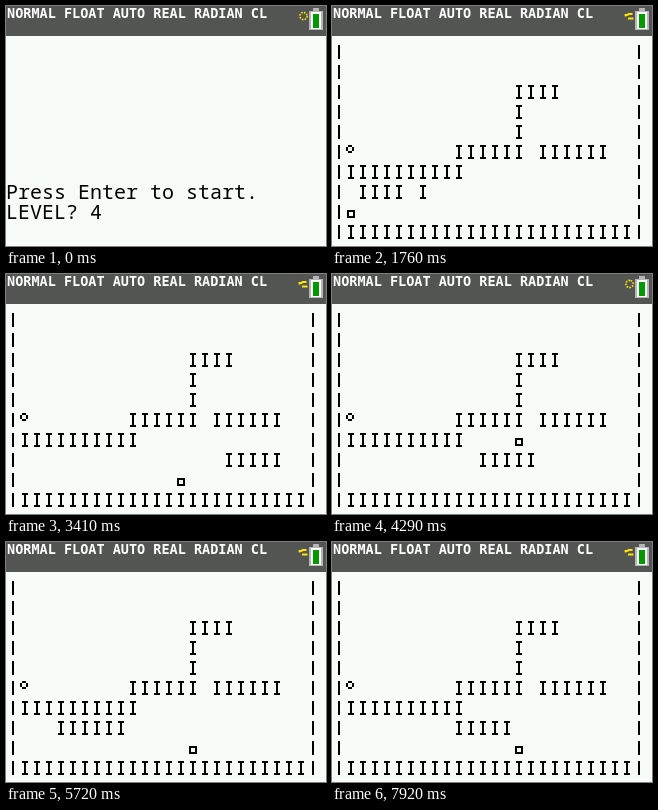
Animation of 320x240 px, one loop 8000 ms. Source, as an HTML page with a canvas:

```html
<!DOCTYPE html>
<html lang="en">
<head>
<meta charset="utf-8">
<title>Calculator platformer</title>
<style>
  html, body { margin: 0; width: 100%; height: 100%; overflow: hidden; background: #f8fcf8; }
  svg, canvas { position: absolute; left: 0; top: 0; display: block; }
  .status { font: bold 13.5px "DejaVu Sans Mono", monospace; fill: #fff; }
  .prompt { font: 20px "Noto Sans Mono", "Liberation Mono", monospace; fill: #000; }
</style>
</head>
<body>
<canvas id="game" width="320" height="240"></canvas>
<svg width="320" height="240" viewBox="0 0 320 240">
  <rect width="320" height="30" fill="#525552"/>
  <text class="status" x="1" y="12">NORMAL FLOAT AUTO REAL RADIAN CL</text>
  <g shape-rendering="crispEdges">
    <path d="M307 2h6v3h4v19h-14v-19h4z" fill="#b5b6b5"/>
    <path d="M305 6h10v17h-10z" fill="#fff"/>
    <path d="M307 8h6v14h-6z" fill="#009a00"/>
  </g>
  <g fill="none" stroke="#ffe600">
    <circle id="ring" cx="297.5" cy="10" r="3.6" stroke-width="1.6" stroke-dasharray="1.6 1.23"/>
    <path id="arc" d="M293.5 10.5v-1.5h2l1-1h4M296 12.5h5.5" stroke-width="1.8"/>
  </g>
  <g id="menu" class="prompt">
    <text x="0" y="193">Press Enter to start.</text>
    <text x="0" y="213">LEVEL? 4</text>
  </g>
</svg>
<script>
(() => {
  const $ = id => document.getElementById(id);
  const ctx = $("game").getContext("2d");
  const LOOP = 8000, STEP = 110, PLATFORM = 5;

  // Blocks as [row, column, length] on a grid of 12 x 20 cells
  const blocks = [
    [3, 15, 4], [4, 15, 1], [5, 15, 1], [6, 10, 6], [6, 17, 6], [7, 1, 10], [10, 1, 24]
  ];

  // Platform runs: [time of arrival, column, ms per cell, last column]
  const runs = [
    [1275, 7, 96.4, 2], [1949, 3, 97, 19], [3695, 18, 97, 12],
    [4422, 11, 145, 9], [4860, 8, 88, 2], [5548, 3, 90, 19], [7150, 18, 87.75, 10]
  ];

  // Player height: [time, row]
  const jumps = [[0, 9], [3780, 8], [3880, 7], [4570, 8], [4660, 9]];

  const moves = [];
  for (const [time, from, pace, to] of runs) {
    const dir = Math.sign(to - from);
    for (let i = 0; i <= Math.abs(to - from); i++)
      moves.push({ time: time + i * pace, col: from + i * dir, dir });
  }

  const rowTop = row => 19 + 20 * row;
  const box = (x, y, w, h) => ctx.fillRect(x, y, w, h);

  function wall(row) {
    box(6, rowTop(row), 2, 14);
    box(306, rowTop(row), 2, 14);
  }

  function block(row, col) {
    const x = 12 * col + 4, y = rowTop(row);
    box(x, y, 6, 2);
    box(x + 2, y, 2, 14);
    box(x, y + 12, 6, 2);
  }

  function blockRow(row, col, length) {
    for (let i = 0; i < length; i++) block(row, col + i);
  }

  function platform(t) {
    const next = moves.find(m => m.time > t);
    const now = moves.filter(m => m.time <= t).pop() || moves[0];
    const age = t - now.time;
    // Moving left, the tail cell is rewritten before the old one goes
    const rewriting = now.dir < 0 && age >= 0 && age < 8;
    blockRow(8, now.col, rewriting ? PLATFORM - 1 : PLATFORM);
    if (rewriting) block(8, now.col + PLATFORM);
    // Moving right, the new head shows before the tail goes
    if (next && next.dir > 0 && next.time - t < 12) block(8, next.col + PLATFORM - 1);
  }

  function goal() {
    const x = 14, y = rowTop(6);
    box(x + 2, y, 4, 2);
    box(x + 2, y + 6, 4, 2);
    box(x, y + 2, 2, 4);
    box(x + 6, y + 2, 2, 4);
  }

  function player(t) {
    const col = Math.max(1, Math.min(15, Math.floor((t - 1817) / 118) + 1));
    const row = jumps.filter(j => j[0] <= t).pop()[1];
    ctx.lineWidth = 2;
    ctx.strokeRect(12 * col + 4, rowTop(row) + 6, 6, 6);
  }

  // Parts in the order the level is printed
  const scene = [];
  for (let row = 1; row <= 10; row++) scene.push(() => wall(row));
  for (const b of blocks) scene.push(() => blockRow(...b));
  scene.push(platform, goal, player);

  function spinner(t) {
    const phase = t < 440 ? 0 : (t / STEP) % 5;
    const flat = phase === 1 || phase === 2;
    $("ring").style.display = flat ? "none" : "";
    $("arc").style.display = flat ? "" : "none";
    $("ring").setAttribute("transform", `rotate(${phase * 72} 297.5 10)`);
  }

  function draw(t) {
    ctx.clearRect(0, 0, 320, 240);
    $("menu").style.display = t < STEP ? "" : "none";
    spinner(t);
    const shown = Math.max(0, Math.floor((t - 330) / 880 * scene.length));
    scene.slice(0, shown).forEach(part => part(t));
  }

  const start = performance.now();
  function tick() {
    const t = (performance.now() - start) % LOOP;
    draw(Math.floor(t / STEP) * STEP);
    requestAnimationFrame(tick);
  }
  tick();
})();
</script>
</body>
</html>
```
